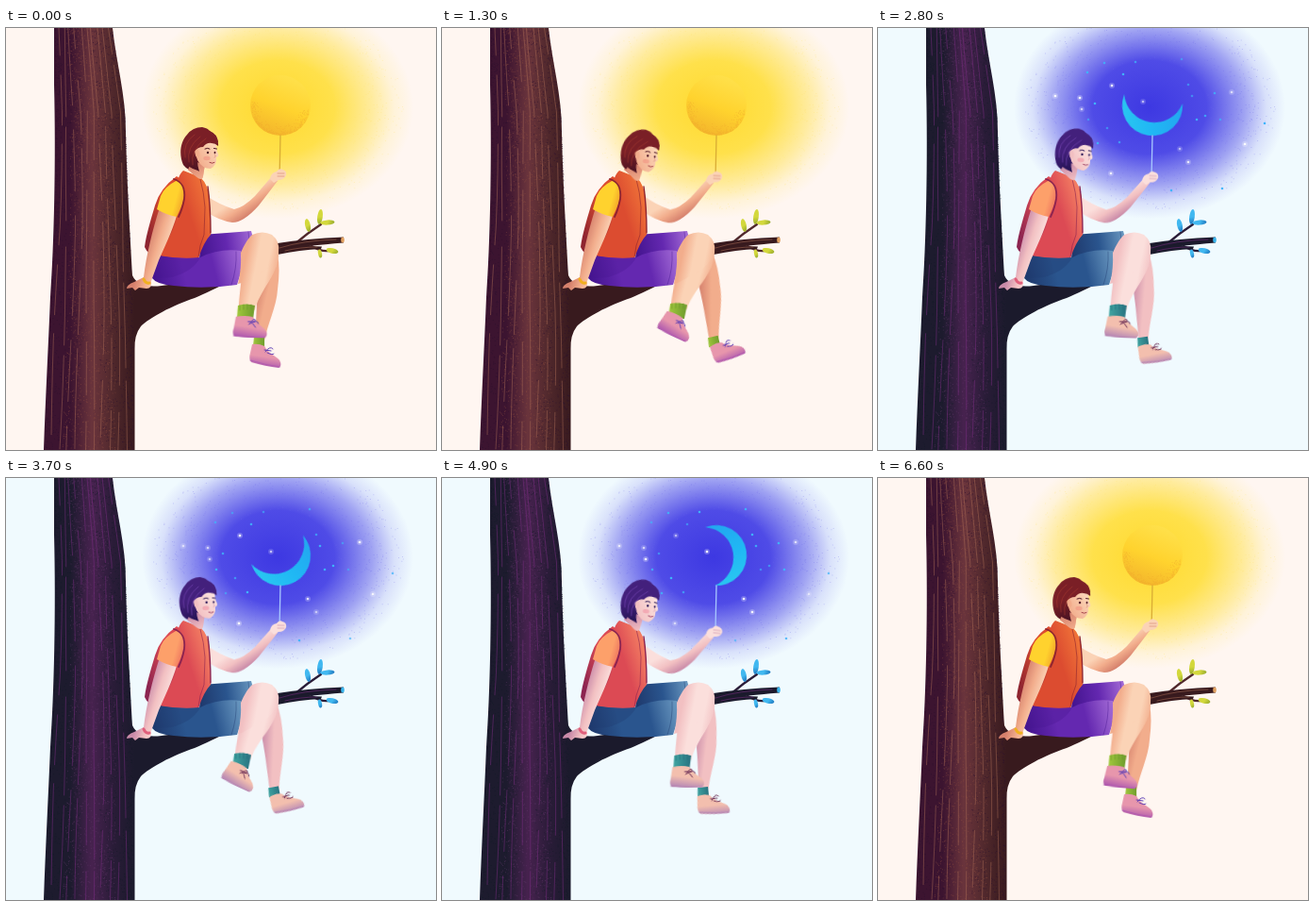
Recreate the animation shown at these times as an HTML page. Size 456 by 447 pixels, loop 6700 ms.

```html
<!DOCTYPE html>
<html lang="en">
<head>
<meta charset="utf-8">
<title>Day and night on a branch</title>
<style>
  html, body { margin: 0; width: 100%; height: 100%; overflow: hidden; background: #fff6f1; }
  svg { display: block; width: 100%; height: 100%; }

  .night { animation: nightfall 6.7s linear infinite; }
  .moon { transform-origin: 291px 82px; animation: moon 6.7s linear infinite; }
  .star { animation: twinkle 1.675s ease-in-out infinite alternate; }
  .head { transform-origin: 206px 156px; animation: head 3.35s ease-in-out infinite; }
  .arm { transform-origin: 232px 200px; animation: arm 6.7s ease-in-out infinite; }

  .shin-back, .foot-back, .shin-front, .foot-front {
    animation: swing 1116.667ms cubic-bezier(.37, 0, .63, 1) -45ms infinite alternate;
  }
  .shin-back { transform-origin: 278px 245px; --from: 0deg; --to: -14.5deg; }
  .foot-back { transform-origin: 268px 330px; --from: 0deg; --to: -20deg; }
  .shin-front { transform-origin: 272px 235px; --from: -.5deg; --to: 4deg; }
  .foot-front { transform-origin: 255px 302px; --from: -2deg; --to: 21deg; }
  .shin-front, .foot-front { animation-delay: -1965ms; }

  @keyframes swing { from { transform: rotate(var(--from)); } to { transform: rotate(var(--to)); } }
  @keyframes nightfall {
    0%, 22.4% { opacity: 0; }
    26.9%, 74.6% { opacity: 1; }
    79.1%, 100% { opacity: 0; }
  }
  @keyframes moon {
    0%, 22.4% { transform: rotate(150deg); }
    28.36% { transform: rotate(137deg); }
    55.22% { transform: rotate(61deg); }
    73.13% { transform: rotate(-9deg); }
    80%, 100% { transform: rotate(-38deg); }
  }
  @keyframes twinkle { from { opacity: 1; } to { opacity: .6; } }
  @keyframes head {
    0%, 100% { transform: none; }
    10% { transform: translate(-.5px, 0) rotate(-2deg); }
    28%, 70% { transform: translate(1px, 2px) rotate(8deg); }
  }
  @keyframes arm {
    0%, 100% { transform: none; }
    28% { transform: skewY(3deg); }
    55% { transform: skewY(2deg); }
    73% { transform: skewY(7deg); }
    85% { transform: skewY(2deg); }
  }
</style>
</head>
<body>
<svg id="stage" viewBox="0 0 456 447" preserveAspectRatio="none"></svg>
<script>
// Each entry: [day, night]
const palette = {
  bg: ['#fff6f1', '#f0fafe'],
  glow: ['#ffd92c', '#3d38e2'], glowMid: ['#ffe046', '#4a46e6'], glowSpeck: ['#ffe06a', '#6c68ea'],
  barkDark: ['#3c1430', '#1d1b2e'], bark: ['#6a343c', '#47224f'], barkMid: ['#50282c', '#2a1c38'],
  barkEdge: ['#381a1e', '#1b1a2c'], barkLine: ['#b07058', '#84308a'],
  barkSpeck: ['#93503f', '#6a3a72'], barkShade: ['#2b0f2c', '#121a26'],
  leaf: ['#d3d83c', '#41b8f0'], leafDark: ['#8fa52c', '#1b6fb8'], cut: ['#e0a060', '#38b4ec'],
  hair: ['#7a1f26', '#43207c'], hairDark: ['#4c1322', '#261456'], hairLight: ['#a33a30', '#7a48b8'],
  skin: ['#fbd3b6', '#fbdfdc'], skinMid: ['#f2ad8c', '#f2c0c2'], skinDark: ['#d5806c', '#c98aa8'],
  blush: ['#f08a7c', '#f0879c'],
  vest: ['#dc4c30', '#dc4a54'], vestLight: ['#ee7038', '#f27c62'], vestDark: ['#8e2430', '#8c2450'],
  sleeve: ['#ffd22e', '#fda06a'], sleeveDark: ['#f09a28', '#ec6c5c'],
  shorts: ['#6428b0', '#2a558e'], shortsLight: ['#a46cd6', '#6a98c0'], shortsDark: ['#451590', '#1f3a6e'],
  sock: ['#9fc63c', '#3fa3a0'], sockDark: ['#6d9a2c', '#28717f'],
  shoe: ['#e796ac', '#f3bfae'], shoeDark: ['#b25cae', '#b98ab4'], lace: ['#5a3cb4', '#6a2c54'],
  band: ['#f0b020', '#e0607c'], string: ['#d9ac34', '#a8c8ff'],
};

function randomFrom(seed) {
  return () => (seed = (seed * 16807) % 2147483647) / 2147483647;
}

function specks(count, seed, place, size = 1) {
  const rnd = randomFrom(seed);
  let d = '';
  for (let k = 0; k < count; k++) {
    const [x, y] = place(rnd);
    d += `M${x.toFixed(1)} ${y.toFixed(1)}h${size}v${size}h-${size}z`;
  }
  return d;
}

// Trunk outline sampled at a few heights
const heights = [0, 90, 200, 320, 447];
const trunkLeft = [51, 52, 51, 45, 40], trunkRight = [113, 127, 132, 136, 136];
function across(u, y) {
  let k = 0;
  while (k < 3 && y > heights[k + 1]) k++;
  const f = (y - heights[k]) / (heights[k + 1] - heights[k]);
  const at = side => side[k] + (side[k + 1] - side[k]) * f;
  return at(trunkLeft) * (1 - u) + at(trunkRight) * u;
}

const trunkSpot = bias => rnd => {
  const y = rnd() * 446, u = bias(rnd());
  return [across(.01 + u * .97, y), y];
};
const haloSpot = rnd => {
  const a = rnd() * Math.PI * 2, r = .45 + .5 * rnd();
  return [288 + 140 * r * Math.cos(a), 84 + 114 * r * Math.sin(a)];
};
const sunSpot = rnd => {
  const a = Math.PI * (.05 + rnd()), r = 31 * Math.sqrt(1 - .6 * rnd() * rnd());
  return [291 + r * Math.cos(a), 82 + r * Math.sin(a)];
};

const stars = [[248, 61], [260, 49], [222, 47], [188, 72], [240, 37], [273, 36], [281, 78], [322, 33],
  [333, 72], [375, 68], [347, 93], [338, 97], [389, 123], [410, 101], [365, 170], [329, 142], [363, 97],
  [243, 106], [320, 128], [223, 97], [256, 121], [247, 154], [311, 172], [230, 80], [214, 74], [233, 122],
  [357, 69], [216, 86], [329, 60]];

function scene(i) {
  const p = Object.fromEntries(Object.entries(palette).map(([name, pair]) => [name, pair[i]]));
  const defs = [];
  const lin = (x1, y1, x2, y2, ...colors) => {
    const id = `g${i}-${defs.length}`;
    const stops = colors.map((c, k) => `<stop offset="${k / (colors.length - 1)}" stop-color="${c}"/>`);
    defs.push(`<linearGradient id="${id}" gradientUnits="userSpaceOnUse" x1="${x1}" y1="${y1}" x2="${x2}" y2="${y2}">${stops.join('')}</linearGradient>`);
    return `url(#${id})`;
  };
  const shape = (d, fill, extra = '') => `<path d="${d}" fill="${fill}" ${extra}/>`;
  const line = (d, color, w = 1, extra = '') =>
    `<path d="${d}" fill="none" stroke="${color}" stroke-width="${w}" stroke-linecap="round" ${extra}/>`;
  const oval = (x, y, rx, ry, fill, turn = 0, extra = '') =>
    `<ellipse cx="${x}" cy="${y}" rx="${rx}" ry="${ry}" fill="${fill}" transform="rotate(${turn} ${x} ${y})" ${extra}/>`;
  const group = (name, ...parts) => `<g class="${name}">${parts.join('')}</g>`;

  defs.push(`<radialGradient id="halo${i}">
    <stop offset="0" stop-color="${p.glow}"/><stop offset=".42" stop-color="${p.glowMid}" stop-opacity=".97"/>
    <stop offset=".7" stop-color="${p.glowMid}" stop-opacity=".48"/>
    <stop offset=".86" stop-color="${p.glowMid}" stop-opacity=".14"/>
    <stop offset="1" stop-color="${p.glowMid}" stop-opacity="0"/></radialGradient>`);

  const sky = `<rect width="456" height="447" fill="${p.bg}"/>`
    + oval(288, 84, 144, 118, `url(#halo${i})`)
    + shape(specks(900, 77, haloSpot), p.glowSpeck, 'opacity=".28"');

  const sun = `<circle cx="291" cy="82" r="32" fill="${lin(302, 52, 278, 114, '#ffe04a', '#ffd32e', '#f3b42c')}"/>`
    + shape(specks(260, 9, sunSpot), '#eda62c', 'opacity=".4"');
  const moon = group('moon', shape('M284 50.8A32 32 0 1 1 284 113.2A32 32 0 0 0 284 50.8Z',
    lin(300, 50, 316, 114, '#22a8f0', '#20b8f4', '#2ac8f0')));
  const starField = stars.map(([x, y], k) => {
    const bright = k % 3 === 0;
    const glint = bright ? oval(x, y, 3, 3, '#fff', 0, 'opacity=".25"') : '';
    return `<g class="star" style="animation-delay:${-k * 310}ms">${glint}${oval(x, y, 1.3, 1.3, bright ? '#fff' : '#3fb4fa')}</g>`;
  }).join('');
  const lamp = (i ? starField + moon : sun) + line('M291 114L290 160', p.string, 1.3);

  const rnd = randomFrom(31);
  let bark = '';
  for (let k = 0; k < 10; k++) {
    const u = .08 + k * .092, sway = rnd() * 6;
    let d = '';
    for (let y = 0; y <= 450; y += 30) {
      d += `${y ? 'L' : 'M'}${(across(u, y) + 1.6 * Math.sin(y / 70 + sway)).toFixed(1)} ${y}`;
    }
    const dash = [100 + rnd() * 90, 10 + rnd() * 25, 40 + rnd() * 60, 10 + rnd() * 20].map(Math.round);
    bark += line(d, p.barkLine, .7, `stroke-dasharray="${dash}" stroke-dashoffset="${Math.round(rnd() * 99)}" opacity=".65"`);
  }
  const leaf = (x, y, rx, ry, turn) => oval(x, y, rx, ry, lin(x - rx, y - ry, x + rx, y + ry, p.leaf, p.leaf, p.leafDark), turn);
  const wood = lin(46, 0, 136, 0, p.barkDark, p.barkDark, p.bark, p.barkMid, p.barkEdge);
  const tree =
    line('M306 229Q320 217 334 208M324 231Q334 237 342 236', p.barkMid, 2.4)
    + leaf(320, 209, 2.8, 7, -12) + leaf(333, 200, 2.8, 8, 8) + leaf(341, 206, 7.5, 2.6, -4)
    + leaf(333, 239, 2, 4.5, -12) + leaf(346, 236, 6.5, 2.8, 12)
    + shape('M51 0L113 0C117 38 127 70 127 110C128 160 132 225 134 262Q140 276 165 273C205 268 240 256 288 228Q318 223 358 221.5L358 227.5Q338 229 322 231L335 231.5L334 234Q312 235 288 240C250 262 222 277 200 286C176 294 152 307 143 316Q136 325 136.5 340L136.5 447L40 447C42 390 45 335 47 285C51 230 53 140 51 60Z', wood)
    + shape(specks(1500, 5, trunkSpot(u => .2 + .6 * u)), p.barkSpeck, 'opacity=".4"')
    + shape(specks(1700, 8, trunkSpot(u => (u < .5 ? u * u * 1.6 : 1 - (1 - u) ** 2 * 1.6))), p.barkShade, 'opacity=".55"')
    + bark
    + line('M290 233Q315 225 350 224M296 236Q312 232 330 232', p.barkLine, .7, 'opacity=".7"')
    + oval(357, 224.5, 1.8, 3, p.cut);

  const shoeFill = (x, y) => lin(x, y, x - 3, y + 21, p.shoe, p.shoe, p.shoeDark);
  const backLeg = group('shin-back',
    shape('M264 240L288 240Q291 255 288 277C287 295 277 314 274 331L264 331C265 310 267 285 266 264Z',
      lin(264, 280, 290, 286, p.skinDark, p.skinMid, p.skinMid)),
    shape('M263 327L274 327L274 338L262 337Z', lin(262, 0, 275, 0, p.sock, p.sockDark)),
    group('foot-back',
      shape('M261 335Q268 334 274 337C278 345 286 347 290 352Q293 358 289 360C280 359 270 357 260 354Q257 350 259 344Z', shoeFill(272, 337)),
      line('M259 352Q275 357 290 359', p.shoeDark, 1.2),
      line('M274 341l7 1M275 343q5 -7 8 -3M277 344q6 3 7 1', p.lace, 1)));

  const arm = group('arm',
    shape('M213 178Q226 187 242 192Q252 190 264 178L282 157L288 162L268 188Q252 206 240 206Q226 204 213 195Z',
      lin(234, 188, 246, 206, p.skin, p.skinMid, p.skinDark)),
    shape('M280 160Q281 153 287 152Q290 148 293 150Q298 151 297 156Q295 161 289 161L284 164Z', p.skin),
    line('M288 154l7 0M288 157l7 0', p.skinDark, .6));

  const backThigh = shape('M207 219Q235 217 260 215Q264 225 259 240L205 244Z',
      lin(206, 232, 262, 224, p.shortsDark, p.shorts, p.shortsLight))
    + line('M257 216Q259 228 255 238', p.shortsDark, .8, 'opacity=".5"');

  const torso =
    shape('M181 157Q163 170 158 188C153 205 149 218 147 232Q150 240 162 243L190 243L198 170Z',
      lin(150, 220, 182, 200, p.vestDark, p.vest))
    + shape('M203 156Q215 165 216 182L217 218L206 224Z', p.sleeve)
    + shape('M188 151C178 160 183 176 182 200C178 215 168 230 162 241Q182 246 204 244Q210 226 217 219L216 184Q215 166 206 158Z',
      lin(172, 205, 217, 190, p.vest, p.vest, p.vestLight))
    + line('M206 160Q210 174 211 190L210 219Q205 230 204 243', p.vestDark, 1, 'opacity=".6"')
    + line('M214 168Q217 190 217 217', p.vestDark, 1.4);

  const thigh = shape('M161 241Q185 245 206 243Q226 233 249 236Q252 254 245 272Q210 277 178 273Q160 272 154 264Q157 250 161 241Z',
      lin(158, 266, 250, 242, p.shortsDark, p.shorts, p.shorts, p.shortsLight))
    + shape('M161 241Q185 246 206 243Q198 258 176 264Q160 266 155 263Z', p.shortsDark, 'opacity=".3"')
    + line('M244 237Q245 255 239 272', p.shortsDark, .8, 'opacity=".5"');

  const legFill = lin(252, 255, 288, 262, p.skinMid, p.skin, p.skin, p.skinMid);
  const frontLeg = group('shin-front',
      shape('M251 250L289 234Q290 248 284 259C277 273 267 285 264 299L247 298C247 286 249 276 251 250Z', legFill),
      shape('M246 294Q255 291 264 294L262 309L245 308Z', lin(246, 0, 264, 0, p.sock, p.sockDark)),
      line('M248 294v5M252 293v5M256 293v5M260 293v5', p.sockDark, .7),
      group('foot-front',
        shape('M244 306Q254 304 262 306C265 314 275 316 277 322Q278 327 274 328Q257 328 243 327Q240 325 242 318Z', shoeFill(258, 306)),
        line('M242 326Q258 328 275 327', p.shoeDark, 1.2),
        line('M257 311l7 0M258 314q6 -9 7 -4M260 313q7 -5 8 0M262 313l3 4', p.lace, 1)))
    + shape('M249 238Q255 224 261 219Q272 214 282 219Q291 226 289 238Q284 251 270 259L250 270L246 271Q250 254 249 238Z', legFill);

  const nearArm =
    shape('M163 190L181 199C176 216 168 232 162 246L154 268Q155 276 149 276L141 275L137 278L134 275L128 276Q128 272 136 269L146 264C149 240 155 215 163 190Z',
      lin(150, 225, 172, 232, p.skinDark, p.skinMid, p.skin))
    + line('M146 266Q148 271 152 270', p.band, 3)
    + shape('M182 161Q168 168 164 178L160 192Q170 198 181 200Q188 186 190 176Q190 166 182 161Z',
      lin(168, 182, 190, 188, p.sleeve, p.sleeve, p.sleeveDark))
    + line('M178 160Q191 164 189 181Q187 192 183 200', p.vestDark, 1.8);

  const neck = shape('M197 141L211 144L209 157Q208 163 201 157L193 150Z', lin(200, 142, 208, 160, p.skinDark, p.skinMid));
  const head = group('head',
    shape('M188 145C183 134 185 120 192 113Q198 105 208 105Q214 106 216 109Q224 112 225 121L212 128L206 152Q194 153 188 145Z',
      lin(188, 110, 204, 150, p.hair, p.hair, p.hairDark)),
    neck,
    shape('M203 126Q212 118 223 121Q223 127 224 131Q227 136 223 137Q224 145 217 149Q208 149 203 140L200 130Z',
      lin(202, 140, 222, 128, p.skinMid, p.skin)),
    shape('M200 131Q203 126 209 126Q213 121 218 122Q222 122 225 125Q226 115 216 109Q206 104 197 109Q186 117 186 132Q187 145 198 149Q204 151 205 152Q203 146 203 140Q200 136 200 131Z',
      lin(192, 108, 206, 148, p.hair, p.hair, p.hairDark)),
    line('M190 137Q187 122 200 113M194 142Q191 126 206 115M198 145Q195 129 212 117', p.hairLight, .6),
    oval(203, 133, 2.4, 4, p.skinMid, -10),
    oval(213, 138, 3.6, 2.2, p.blush, 0, 'opacity=".5"'),
    line('M211 128q3 -1.5 5 0M220.5 127.5l3 .5', p.hairDark, 1),
    oval(214, 132, 1.2, 1.3, p.hairDark), oval(221.5, 132, .9, 1.2, p.hairDark),
    line('M216 142.5q3 1.5 5 0', p.vestDark, .8),
    line('M221 134q3 2 0 3', p.skinDark, .6));

  const body = sky + lamp + tree + backLeg + arm + backThigh + neck + torso + thigh + frontLeg + nearArm + head;
  return `<g class="${i ? 'night' : 'day'}"><defs>${defs.join('')}</defs>${body}</g>`;
}

document.getElementById('stage').innerHTML = scene(0) + scene(1);
</script>
</body>
</html>
```
